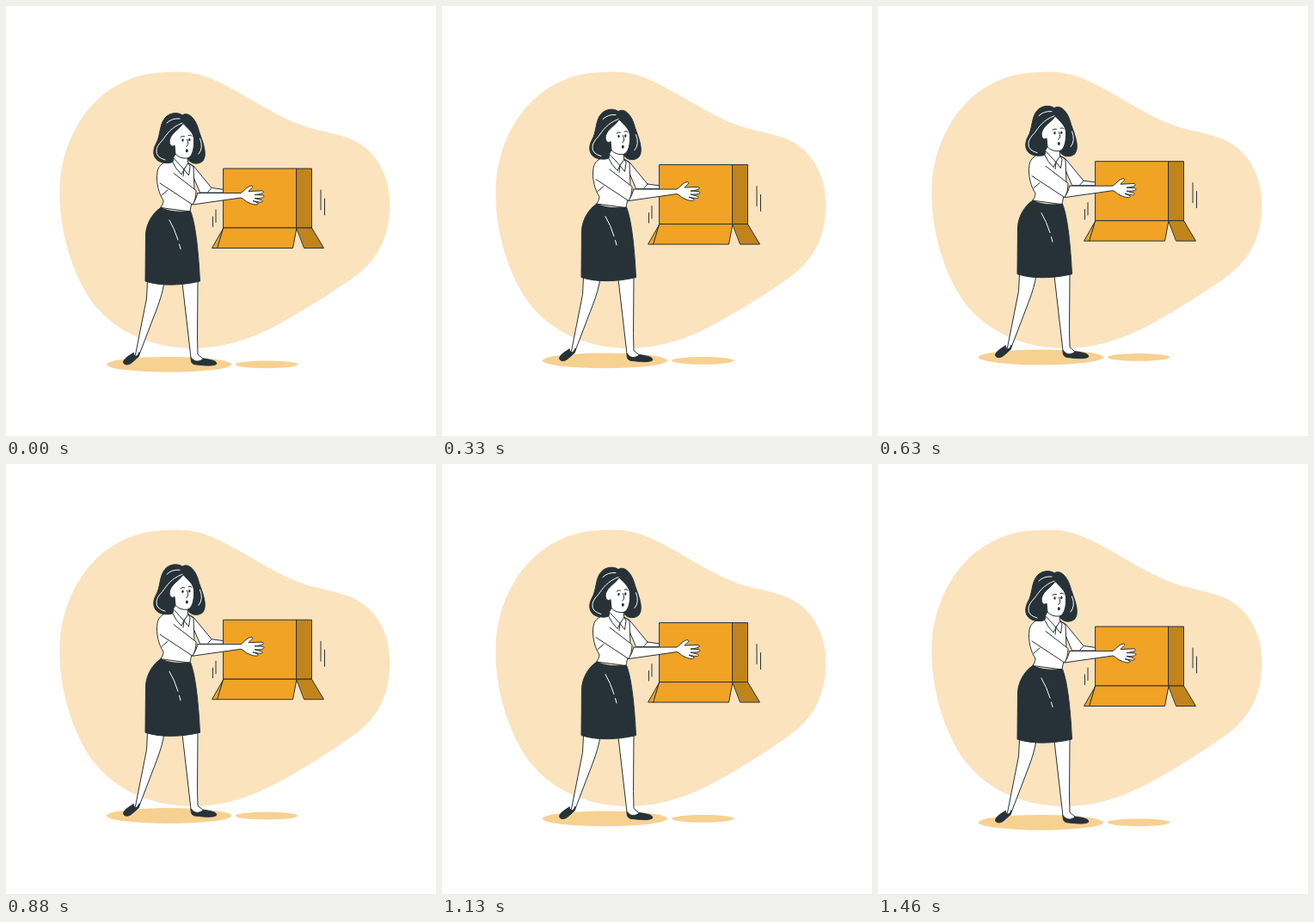
Animation of 500x500 px, one loop 1500 ms. Source, as an HTML page:

```html
<!DOCTYPE html>
<html lang="en">
<head>
<meta charset="utf-8">
<title>Woman holding a box</title>
<style>
  html, body { margin: 0; width: 100%; height: 100%; overflow: hidden; background: #fff; }
  svg { display: block; width: 100vw; height: 100vh; }
  .ink { stroke: #263238; stroke-width: 1; stroke-linejoin: round; stroke-linecap: round; }
  .ink .dark { fill: #263238; }
  .ink .line { fill: none; }
  .ink .shine { fill: none; stroke: #fff; }
  .ink .front { fill: #f0a324; }
  .ink .side { fill: #c0841b; }
</style>
</head>
<body>
<svg viewBox="0 0 500 500">
  <path fill="#fbe3be" d="M62.500 213C64 150 105 78 188 77C225 74 247 87 285 109C308 122 327 134 354 142C376 148 395 150 411 160C433 174 447 200 446.500 234C445 271 431 297 402 317C372 338 347 353 317 370C287 386 255 398 216 398C160 397 122 373 100 344C79 315 61 263 62.500 213Z"/>
  <g id="floating">
    <g fill="#f7d191">
      <ellipse cx="189.500" cy="416.800" rx="72.500" ry="8.900"/>
      <ellipse cx="303" cy="416.800" rx="36.300" ry="4.400"/>
    </g>
    <g class="ink" fill="#fff">
      <!-- legs and shoes -->
      <path d="M164.500 320L163.500 340L151 403L149 410L154 408L157 400L175 353Q182 335 184 321Z"/>
      <path d="M205 322L215 409L222 415L230 411L223 405L222.500 385L223 320Z"/>
      <path class="dark" d="M148 403.500C144 406 137.500 409.500 136.500 414C137 418 143 418 147 414C151 410.500 155.500 407.500 155 402.500C153 408 149.500 409 148 403.500Z"/>
      <path class="dark" d="M215 409C215 414 216 417 222 417C230 418 240 419 244.500 416.500C246 413 240 411.500 229.500 410C225 414.500 218 414 215 409Z"/>

      <!-- far arm -->
      <path d="M211 182L218 186L239 211.500L254 213.500V217H226Z"/>
      <path class="line" d="M239 211.500L235 216"/>

      <!-- box -->
      <path class="front" d="M253 189H338V258H253Z"/>
      <path class="side" d="M338 189H355.500V258H338Z"/>
      <path class="front" d="M253 258L239.500 281.500H246Z"/>
      <path class="front" d="M253 258H338L333.500 281.500H246Z"/>
      <path class="side" d="M338 258H355.500L369.500 281.500H347Z"/>

      <!-- shirt -->
      <path d="M194 178C185 180 177 185 176 193C174 205 178 219 183 226C183 230 181 232 180 234.500L214 239C215 231 218 225 219 214L218 187L211 182Z"/>
      <path class="line" d="M181 220L188 214"/>

      <!-- skirt -->
      <path class="dark" d="M180 234.500C171 240 163.500 252 162.500 265L162 320C180 326 205 325 225.500 320C224 290 221 255 214.500 238.500C203 240 190 239.500 180 234.500Z"/>
      <path class="shine" d="M190 249Q196 259 200 272M201.500 277L203 282.500"/>

      <!-- hair, face and neck -->
      <path class="dark" d="M205 127C200 123 190 124 185 130C178 138 180 151 174 161C169 171 172 182 186 182.500C192 183 196 181 198 177H211C214 184 224 185 229 180C235 172 228 156 224.500 146C221 131 212 122 205 127Z"/>
      <path d="M206 136.500C201 144 193 147 190.500 155C189 161 193 165 196 162L197 172L193.500 178L206 190L212 185L211 177C217 175 219 165 218.500 155C218 147 212 143 206 136.500Z"/>
      <path class="line" d="M197 172Q202 178 211 177M203 152.500Q205 150.500 207.500 151.500M212 150.500Q214 149 216 151M210.500 155Q213.500 162 209.500 163.500"/>
      <g class="dark" stroke="none">
        <ellipse cx="205.500" cy="156" rx="1.200" ry="1.700"/>
        <ellipse cx="213.300" cy="155.500" rx="1.200" ry="1.700"/>
        <ellipse cx="210.300" cy="168.300" rx="1.500" ry="2"/>
      </g>
      <path class="shine" d="M187 136Q193 130 202 131M205 136C192 141 187 149 182 156Q175 163 175 168Q174 176 185 179M225.500 154Q230 165 224 172"/>

      <!-- collar -->
      <path d="M195 177L207 190L204 196Q197 189 194 182Z"/>
      <path d="M211.500 183L207 190L212.500 197L214 187Z"/>
      <path class="line" d="M207 190L206 198"/>

      <!-- near arm and hand -->
      <path stroke="none" d="M181 190L195 194L221 214.500L217 231L179 206Z"/>
      <path class="line" d="M195 194.500L221 214.500Q221 225 217 231L179 206"/>
      <path d="M223 217.500H273C278 214 281 209 286 209C289 211 283 213 282 215.500L298 214.800C301 216.500 299 218.500 289 219.500L299 220C301.500 222 299 224 289 223.500L297.500 225.800C300 228 297 229 287 226.500L293 229C295 231.500 288 231.500 283 229C278 227.500 276 223.500 273 223L217 231Q221 225 223 217.500Z"/>

      <!-- motion marks -->
      <path class="line" d="M240.500 245V256.500M244 237V251.500M366 214V237M370.500 224V243"/>
    </g>
  </g>
</svg>
<script>
  const LOOP = 1500, STEPS = 36, LIFT = 10;
  const floating = document.getElementById("floating");

  // Linear rise and fall, sampled mid-step.
  function draw(now) {
    const step = Math.floor((now % LOOP) / LOOP * STEPS + 0.1) % STEPS;
    const phase = (step + 0.5) / STEPS;
    const rise = LIFT * (1 - Math.abs(2 * phase - 1));
    floating.setAttribute("transform", `translate(0 ${0.28 - rise})`);
  }

  const start = performance.now();
  function tick() {
    draw(performance.now() - start);
    requestAnimationFrame(tick);
  }
  tick();
</script>
</body>
</html>
```
